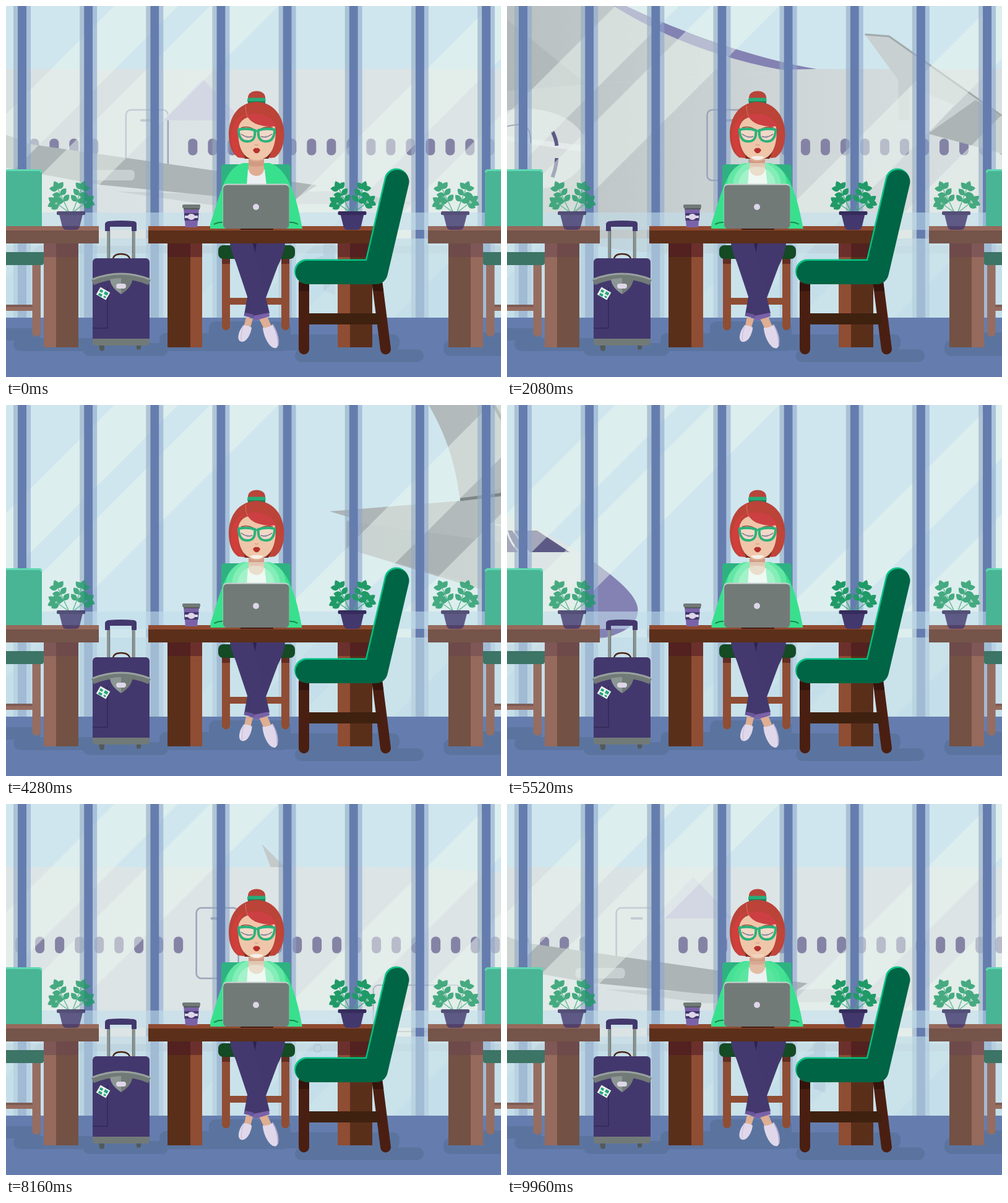
These frames come from a looping animation (800 px wide and 600 px high, 10000 ms). An HTML page:

```html
<!DOCTYPE html>
<html lang="en">
<head>
<meta charset="utf-8">
<title>Airport lounge</title>
<style>
  html, body { margin: 0; width: 100%; height: 100%; overflow: hidden; background: #cfe6ee; }
  svg { display: block; width: 800px; height: 600px; }
</style>
</head>
<body>
<svg viewBox="0 0 800 600" fill="none">
  <defs>
    <linearGradient id="skin" gradientUnits="userSpaceOnUse" x1="-3430" x2="-1800" y1="0" y2="0">
      <stop stop-color="#adb4b5"/><stop offset=".27" stop-color="#bac1c2"/><stop offset=".48" stop-color="#ccd3d4"/>
      <stop offset=".7" stop-color="#d7dee0"/><stop offset="1" stop-color="#dce4e5"/>
    </linearGradient>
    <clipPath id="jacketClip"><path d="M384 254C354 260 346 305 330 353V360H479C470 310 456 262 426 254Z"/></clipPath>
    <g id="pot">
      <g id="leaves"></g>
      <path d="M-19 337H19L14 357Q12 362 8 362H-8Q-12 362-14 357Z" fill="#43386d"/>
      <rect x="-23" y="332" width="46" height="6" rx="2" fill="#352c5c"/>
    </g>
    <g id="sideTable">
      <path d="M61 384H81V552H61Z" fill="#966a5c"/><path d="M81 384H117V552H81Z" fill="#735144"/>
      <path d="M61 384H117V406H61Z" fill="#6a4550" opacity=".5"/>
      <path d="M0 356H150V384H0Z" fill="#75544a"/><path d="M0 356H150V363H0Z" fill="#966a5c"/>
    </g>
    <g id="sideChair">
      <path d="M0 483H44V493H0Z" fill="#966d61"/><path d="M0 483H44V487H0Z" fill="#7d5d56"/>
      <path d="M42.500 415H56V528A6.700 6.700 0 0 1 42.500 528Z" fill="#966d61"/>
      <path d="M-60 264H53Q58 264 58 269V360H-60Z" fill="#49b595"/>
      <path d="M-60 265.500H53Q56 265.500 57 269" stroke="#5fd9b2" stroke-width="3"/>
      <path d="M-60 398H61V415Q61 419 57 419H-60Z" fill="#3c7466"/>
    </g>
  </defs>

  <path d="M0 0H800V504H0Z" fill="#cfe6ee"/>

  <!-- Airliner, x measured from the tip of its nose -->
  <g id="plane">
    <path d="M0 331C-2 302-50 269-86 243C-150 203-230 165-304 148C-400 128-550 103-745 102H-2522L-2893 127L-3224 155L-3435 172L-3395 184L-3408 188V232L-3218 290L-2900 382Q-2830 400-2750 400H-150C-80 394 0 371 0 331Z" fill="url(#skin)"/>
    <path d="M-2700 388H-200V400H-2700Z" fill="#bcc8cf"/>
    <path d="M-2522 102C-2640 82-2760 33-2830 0H-3275C-3240 60-3230 110-3224 155L-2893 127Z" fill="url(#skin)"/>
    <path d="M-3224 155L-2893 127L-3040 98L-3103 118ZM-3160 0L-3103 115L-2893 127L-3050 0Z" fill="#a3abad" opacity=".4"/>
    <path d="M-3170 0L-3103 115L-3160 145L-3224 153" stroke="#7d8687" stroke-width="5"/>
    <path d="M-2522 102C-2640 82-2760 33-2830 0H-2850C-2770 50-2680 84-2580 103Z" fill="#8482b3"/>
    <path d="M-3408 188L-3100 230L-3060 330L-3408 232Z" fill="#a3abad" opacity=".45"/>
    <ellipse cx="-2993" cy="232" rx="100" ry="66" fill="#d7dddd"/>
    <path d="M-3190 190L-2897 226L-2898 236L-3063 212Z" fill="#e4e9ea"/>
    <path d="M-3067 212Q-3034 193-2997 191Q-2983 198-2984 222M-3089 250Q-3064 275-3017 290" stroke="#5c5a85" stroke-width="2"/>
    <path d="M-2949 203Q-2943 215-2942 226M-2942 246Q-2943 262-2949 277" stroke="#5c5a85" stroke-width="6"/>
    <g id="ports"></g>
    <rect x="-753" y="293" width="142" height="75" rx="8" stroke="#adb6c4" stroke-width="2"/>
    <circle cx="-843" cy="395" r="6" stroke="#98a6b4" stroke-width="2"/>
    <path d="M-933 65L-896 102H-919Z" fill="#c4caca"/>
    <path d="M-245 203H-163L-110 238H-208C-236 238-243 220-245 203Z" fill="#5c5a85"/>
    <path d="M-212 202Q-206 225-190 239M-202 202L-176 239" stroke="#dce4e5" stroke-width="3"/>
    <path d="M-80 247C-45 273 0 305 0 331C0 357-25 372-70 380Q-80 381-80 381Z" fill="#8482b3"/>
    <path d="M-1820 118L-1885 185H-1755Z" fill="#d3d7e3"/>
    <path d="M-1960 300L-1804 304L-1600 299L-1482 319L-1804 322Z" fill="#ccd3d5"/>
    <path d="M-2340 203L-2137 218L-1635 290L-1670 312L-1804 307L-1987 289L-2137 262L-2340 207Z" fill="#adb4b5"/>
    <rect x="-2010" y="265" width="80" height="17" rx="6" fill="#c8cfd0"/>
    <path d="M-2444 46L-2405 49L-2222 178L-2137 218L-2340 205L-2300 160L-2372 130V185H-2390V120Z" fill="#c9d0d1"/>
    <path d="M-2340 205L-2265 152L-2222 178L-2100 222L-2222 235Z" fill="#adb4b5"/>
    <path d="M-2444 46L-2405 49L-2222 178" stroke="#a1a9aa" stroke-width="3"/>
    <path d="M-1647 412L-1606 396V410ZM-1625 385H-1606V468L-1625 460Z" fill="#99a8c0" opacity=".6"/>
  </g>

  <g id="shine" fill="#ebf6ef" opacity=".5"></g>
  <g id="beams"></g>
  <path d="M0 334H800V362H0Z" fill="#c1dfec" opacity=".58"/>
  <path d="M0 376H800V504H0Z" fill="#c1dce8" opacity=".66"/>

  <path d="M0 504H800V600H0Z" fill="#657dae"/>
  <g id="shadows" fill="#5b749f"></g>

  <use href="#sideChair"/>
  <use href="#sideTable"/>
  <use href="#sideChair" transform="translate(832) scale(-1 1)"/>
  <use href="#sideTable" transform="translate(832) scale(-1 1)"/>
  <use href="#pot" x="105" opacity=".8"/>
  <use href="#pot" x="726" opacity=".8"/>

  <!-- Suitcase -->
  <g>
    <path d="M165.500 358V408M206.500 358V408" stroke="#8c9694" stroke-width="5"/>
    <path d="M167.500 362V408M204.500 362V408" stroke="#727a78" stroke-width="1.500"/>
    <path d="M160 364V352Q161 349 165 348Q186 346 207 348Q211 349 211 352V364H203V357H168V364Z" fill="#43386d"/>
    <path d="M173 408Q175 401 186 401T200 408" stroke="#4b2412" stroke-width="2.500"/>
    <path d="M150 548H159V554A4 4 0 0 1 151 554ZM211 548H218V554A4 4 0 0 1 211 554Z" fill="#525a59"/>
    <rect x="140" y="408" width="92" height="140" rx="6" fill="#43386d"/>
    <path d="M140 538H232V544Q232 549 227 549H145Q140 549 140 544Z" fill="#727a78"/>
    <path d="M164 455V521H140" stroke="#32295a" stroke-width="1.500"/>
    <path d="M140 447Q186 428 232 447" stroke="#727a78" stroke-width="9"/>
    <path d="M140 442Q186 424 232 442" stroke="#98a29e" stroke-width="3"/>
    <path d="M168 442Q186 438 204 442Q203 455 186 466Q169 455 168 442Z" fill="#8c9694"/>
    <path d="M186 439Q197 440 204 442Q203 455 186 466Z" fill="#727a78"/>
    <rect x="178" y="449" width="16" height="8" rx="4" fill="#ddd6e8"/>
    <g transform="translate(157 465) rotate(30)">
      <path d="M-9-7H9V7H-9Z" fill="#f0f3f3"/>
      <path d="M-7-4H-2V0H-7ZM1-5H7V0H1ZM-6 2H0V6H-6ZM3 2H7V5H3Z" fill="#26a77b"/>
    </g>
  </g>

  <!-- Seat behind the desk -->
  <path d="M353 256H455Q460 256 460 261V360H348V261Q348 256 353 256Z" fill="#2fb281"/>
  <path d="M362 472H445V483H362Z" fill="#8f4d33"/>
  <path d="M355.500 405V518M451.500 405V518" stroke="#8f4d33" stroke-width="13" stroke-linecap="round"/>
  <path d="M349 405H362V417H349ZM445 405H458V417H445Z" fill="#632d21"/>
  <rect x="343" y="387" width="124" height="22" rx="8" fill="#144a24"/>

  <!-- Legs -->
  <path d="M390 384H420L405 412Z" fill="#2c2350"/>
  <g id="leftShoe">
    <path d="M388 503L399 506L394 523L384 520Z" fill="#dfae93"/>
    <path d="M384 516Q393 517 397 520C396 529 390 543 381 543C371 542 376 524 384 516Z" fill="#e0d8ea"/>
    <path d="M384 516Q379 530 380 541" stroke="#c5badb"/>
  </g>
  <g id="rightShoe">
    <path d="M409 506L422 502L430 520L418 524Z" fill="#dfae93"/>
    <path d="M415 520Q424 521 431 515C439 525 445 547 437 553C427 556 416 535 415 520Z" fill="#e0d8ea"/>
    <path d="M431 515Q440 530 440 549" stroke="#b3a7cf" stroke-width="1.500"/>
  </g>
  <path d="M405 384H451Q449 402 439 421L408 504L385 499L399 420Z" fill="#43386d"/>
  <path d="M387 496L409 501L407 507L384 501Z" fill="#6b559b"/>
  <path d="M362 384H399L426 497L401 503L371 413Q364 398 362 384Z" fill="#44396e"/>
  <path d="M400 501L425 496L426 502L402 509Z" fill="#7a62a8"/>

  <!-- Desk -->
  <path d="M261 384H317V552H261ZM536 384H592V552H536Z" fill="#5a2f1a"/>
  <path d="M298 384H317V552H298ZM536 384H556V552H536Z" fill="#8f4d33"/>
  <path d="M261 384H317V406H261ZM536 384H592V406H536Z" fill="#4a1426" opacity=".5"/>
  <path d="M230 356H610V384H230Z" fill="#5c2f1a"/>
  <path d="M230 356H610V363H230Z" fill="#8f4a30"/>

  <!-- Coffee -->
  <path d="M287 327H312L309 358H290Z" fill="#7a62a8"/>
  <path d="M288 335H311.500L310.500 347H288.500Z" fill="#43386d"/>
  <ellipse cx="299.500" cy="341" rx="6" ry="5" fill="#ddd6e8"/>
  <path d="M289 339H310V343H289Z" fill="#ddd6e8"/>
  <rect x="285" y="321" width="29" height="6" rx="2" fill="#727a78"/>
  <path d="M287 327H313V329H287Z" fill="#525a59"/>

  <use href="#pot" x="559.500"/>

  <!-- Traveller -->
  <g>
    <g id="jacket">
      <path d="M384 254C354 260 346 305 330 353V360H479C470 310 456 262 426 254Z" fill="#38e08d"/>
      <path d="M336 353Q344 349 351 350M472 353Q465 349 457 350" stroke="#168a4d" stroke-width="2"/>
    </g>
    <path d="M391 264H418L421 290H389Z" fill="#eceff2"/>
    <path d="M392 243H417V265Q415 274 405 275Q394 274 392 265Z" fill="#dfad93"/>
    <path d="M392 248Q405 255 417 248V258Q405 262 392 258Z" fill="#c99179" opacity=".6"/>
    <g id="glow" clip-path="url(#jacketClip)" fill="#f0fff4">
      <circle cx="404" cy="290" r="48" opacity=".22"/>
      <circle cx="404" cy="290" r="39" opacity=".25"/>
      <circle cx="404" cy="290" r="30" opacity=".28"/>
    </g>

    <path d="M391 158V148Q392 138 405 137.500Q418 138 419 148V158Z" fill="#b8443a"/>
    <rect x="390" y="148.500" width="29.500" height="8" rx="3" fill="#27ad78"/>
    <path d="M391 154H419V158H391Z" fill="#1c7e58"/>
    <path d="M378 236H432L424 247H386Z" fill="#7c2d20"/>
    <path d="M405 155C373 156 360 183 360 207C360 225 365 238 375 245L386 246L382 225H430L426 246L434 245C445 238 449.500 223 449.500 206C449 180 434 156 405 155Z" fill="#bb4338"/>
    <path d="M376 195Q381 178 405 178Q431 179 435 197C438 219 431 249 405 249C379 249 373 219 376 195Z" fill="#efc6aa"/>
    <path id="chin" d="M394 244Q405 241 416 244Q412 249 405 249T394 244Z" fill="#f7efe8"/>
    <path d="M389 174C371 184 375 206 375 222Q376 236 385 246L374 243C365 233 361 211 366 198C370 185 378 176 389 174Z" fill="#d13e3c"/>
    <path d="M436 191Q440 204 435 222Q432 236 425 245L434 245C445 238 449 222 449 206Z" fill="#c14439"/>
    <path d="M389 176C407 170 430 176 437 194Q424 197 408 192Q394 188 389 176Z" fill="#cc3f42"/>
    <path d="M387 161Q387 171 390 179" stroke="#d87460"/>
    <path d="M380 197Q390 193 400 199M431 197Q421 194 411 199" stroke="#9b4b3c" stroke-width="1.500"/>
    <path d="M376 200Q390 197 402 201Q404 219 390 219Q378 219 376 204ZM434 200Q420 197 408 201Q406 219 420 219Q432 219 434 204Z" fill="#f1d8c6" stroke="#2cb27b" stroke-width="4"/>
    <path d="M402 203Q405 201 408 203" stroke="#2cb27b" stroke-width="3"/>
    <path d="M380 207Q389 214 398 211M430 207Q421 214 412 211" stroke="#766f83" stroke-width="1.500"/>
    <path d="M386 210Q390 216 394 211ZM416 211Q420 216 424 210Z" fill="#8c8fb1"/>
    <path d="M402 224Q405 226 408 224" stroke="#d39b82" stroke-width="1.500"/>
    <path d="M399 233Q402 228 405 230Q408 228 411 233Q408 239 405 238Q402 239 399 233Z" fill="#b6302c"/>
  </g>

  <!-- Laptop -->
  <path d="M379 359H432V362H379Z" fill="#401a10"/>
  <rect x="350.500" y="287.500" width="107" height="70" rx="6" fill="#cbd2d2"/>
  <rect x="351" y="289.500" width="106.500" height="70.500" rx="6" fill="#727a78"/>
  <circle cx="404" cy="325" r="5" fill="#ddd6e8"/>

  <!-- Front chair -->
  <path d="M481.500 448V555M600 448L613.500 555" stroke="#4a1f12" stroke-width="17" stroke-linecap="round"/>
  <path d="M490 497H604L606 515H490Z" fill="#3f2110"/>
  <path d="M473 448H490V461H473ZM592 448H608L610 461H593Z" fill="#35140c"/>
  <g stroke-width="39" stroke-linecap="round" stroke-linejoin="round">
    <path d="M485.500 429H596.500L631 282" stroke="#00c284"/>
    <path d="M487 431H598L632.500 284" stroke="#006544" stroke-width="38"/>
  </g>
</svg>

<script>
const LOOP = 10000;
const byId = id => document.getElementById(id);
const fill = (id, parts) => { byId(id).innerHTML = parts.join(''); };
const rect = (x, y, w, h, more = '') => `<rect x="${x}" y="${y}" width="${w}" height="${h}" ${more}/>`;

// Cabin doors and the row of windows that skips them
const doors = [-349, -1039, -1944, -2699];
const ports = doors.map(x =>
  rect(x, 168, 68, 114, 'rx="8" stroke="#9ca4ba" stroke-width="2.500"') +
  rect(x + 23, 183, 20, 4, 'rx="2" fill="#9ca4ba"'));
for (let x = -396; x > -2600; x -= 32)
  if (!doors.some(d => x > d - 25 && x < d + 93))
    ports.push(rect(x - 7.5, 214.5, 15, 27, 'rx="7" fill="#8583a5"'));
fill('ports', ports);

// Diagonal reflections, given by where they cross the top edge
fill('shine', [[175, 278], [330, 440], [782, 885], [976, 1130]].map(([a, b]) =>
  `<path d="M${a} 0H${b}L${b - 504} 504H${a - 504}Z"/>`));

fill('beams', Array.from({ length: 8 }, (_, i) => {
  const x = 12 + i * 107.15;
  return rect(x, 0, 7, 504, 'fill="#93abc4" opacity=".6"') +
    rect(x + 21, 0, 7, 504, 'fill="#8ba6cf" opacity=".58"') +
    rect(x + 7, 0, 14, 504, 'fill="#657dae"');
}));

fill('shadows', [[-20, 521, 76, 20], [12, 537, 138, 21], [124, 545, 138, 21], [248, 529, 150, 29],
  [328, 510, 132, 48], [440, 531, 196, 26], [467, 555, 208, 21], [707, 541, 120, 25], [717, 528, 110, 22]]
  .map(([x, y, w, h]) => rect(x, y, w, h, `rx="${Math.min(10, h / 2)}"`)));

// Potted plant: bare stems that carry paired leaves near the top
const leaf = (x, y, angle) =>
  `<path transform="translate(${x} ${y}) rotate(${angle})" d="M0 0Q6-9 14 0Q6 9 0 0Z" fill="#209a67"/>`;
fill('leaves', [[-21, 296, 3], [17, 296, 3], [26, 316, 2], [-25, 318, 2]].map(([tx, ty, pairs]) => {
  const x0 = tx / 6, heading = Math.atan2(ty - 333, tx - x0) * 180 / Math.PI;
  let out = `<path d="M${x0} 333L${tx} ${ty}" stroke="#45ae80" stroke-width="1.500"/>`;
  for (let i = 0; i < pairs; i++) {
    const k = 1 - .27 * i;
    const x = x0 + (tx - x0) * k, y = 333 + (ty - 333) * k;
    out += leaf(x, y, heading - 62) + leaf(x, y, heading + 62);
  }
  return out + leaf(tx, ty, heading);
}));

const noseAt = t => {
  const time = t < 4960 ? t + LOOP : t;
  return time < LOOP ? 211 + .43 * (time - 5520) : 2137.4 + .4253 * (time - LOOP);
};

function draw() {
  const t = performance.now() % LOOP;
  byId('plane').setAttribute('transform', `translate(${noseAt(t)})`);
  const light = Math.min(1, t / 120, (LOOP - t) / 120);
  byId('glow').setAttribute('opacity', light);
  byId('chin').setAttribute('opacity', light);
  const sway = (1 - Math.cos(t / LOOP * 2 * Math.PI)) / 2;
  byId('leftShoe').setAttribute('transform', `rotate(${-3 * sway} 392 506)`);
  byId('rightShoe').setAttribute('transform', `rotate(${2 * sway} 416 506)`);
  byId('jacket').setAttribute('transform', `translate(${404 * .008 * sway}) scale(${1 - .008 * sway} 1)`);
  requestAnimationFrame(draw);
}
draw();
</script>
</body>
</html>
```
